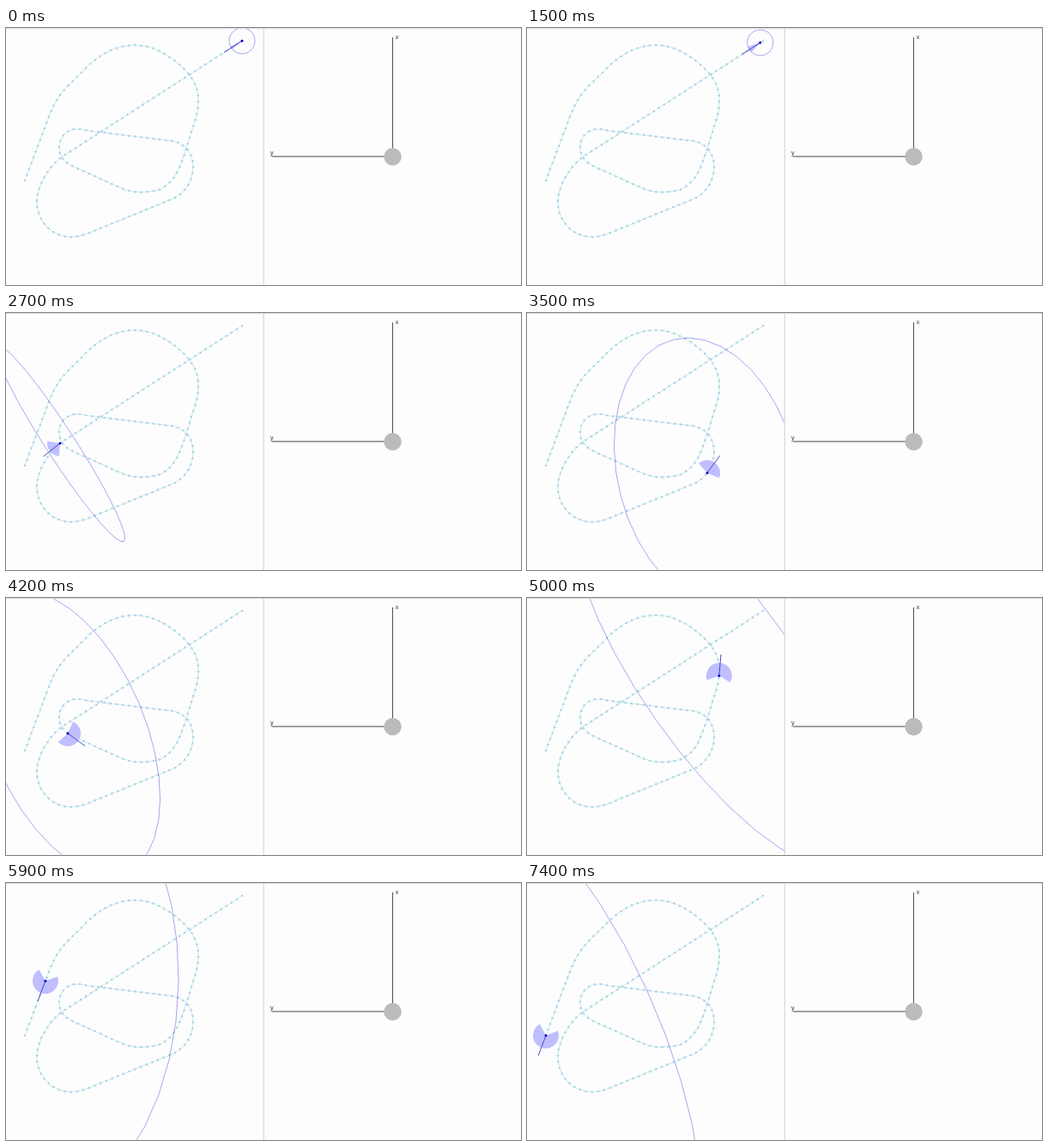
An HTML page with a canvas that plays this animation: 600x300 px, repeating every 7700 ms.

```html
<!DOCTYPE html>
<html lang="en">
<head>
<meta charset="utf-8">
<title>Robot pose uncertainty</title>
<style>
html, body { margin: 0; width: 100%; height: 100%; overflow: hidden; background: #fdfdfd; }
canvas { display: block; }
</style>
</head>
<body>
<canvas id="stage" width="600" height="300"></canvas>
<script>
const ctx = document.getElementById('stage').getContext('2d');
const LOOP = 7700, STEP = 100;

const waypoints = [
  275,15, 72,146, 63,152, 50,166, 40,184, 36,205, 41,223, 55,238, 75,244, 92,241,
  102,237, 188,202, 198,197.5, 209,188, 216,175, 218,162, 216,150, 210,140, 203,135, 195,132,
  186,131, 96,120, 85,118, 76,119, 68,124, 63,132, 62,142, 65,151, 72,158, 79,162, 88,166,
  130,185, 140,189, 152,191.5, 166,191, 180,188, 190,181, 198,171, 204,158, 210,141,
  217,118, 222,102, 224,88, 223,74, 219,63, 213,54, 200,41, 186,31, 169,23, 151,20,
  134,22, 118,28, 104,37, 85,55, 64,77, 58,86, 54,94, 49,106, 22,178
];

// Smooth curve through the waypoints, sampled about once per pixel.
function buildTrack() {
  const pts = [];
  for (let i = 0; i < waypoints.length; i += 2) pts.push({ x: waypoints[i], y: waypoints[i + 1] });
  const chords = pts.slice(1).map((p, i) => {
    const dx = p.x - pts[i].x, dy = p.y - pts[i].y, len = Math.hypot(dx, dy);
    return { x: dx / len, y: dy / len, len };
  });
  const tangents = pts.map((p, i) => {
    const a = chords[Math.max(0, i - 1)], b = chords[Math.min(chords.length - 1, i)];
    // Long straights keep their direction up to the joint.
    const wa = a.len > 40 ? 1 : b.len > 40 ? 0 : b.len, wb = b.len > 40 ? 1 : a.len > 40 ? 0 : a.len;
    const x = a.x * wa + b.x * wb, y = a.y * wa + b.y * wb, n = Math.hypot(x, y);
    return { x: x / n, y: y / n };
  });
  const track = [{ ...pts[0], s: 0 }];
  chords.forEach(({ len }, i) => {
    const n = Math.ceil(len);
    for (let k = 1; k <= n; k++) {
      const u = k / n, v = 1 - u;
      const mix = c => pts[i][c] * (1 + 2 * u) * v * v + pts[i + 1][c] * u * u * (3 - 2 * u)
        + len * (tangents[i][c] * u * v * v - tangents[i + 1][c] * u * u * v);
      const last = track[track.length - 1], x = mix('x'), y = mix('y');
      track.push({ x, y, s: last.s + Math.hypot(x - last.x, y - last.y) });
    }
  });
  // Heading, and the heading variance picked up on the way to each sample.
  track.forEach((p, i) => {
    const q = track[i - 1] || p, r = track[i + 1] || p;
    p.dir = Math.atan2(r.y - q.y, r.x - q.x);
    const ds = p.s - q.s, turn = Math.abs(Math.atan2(Math.sin(p.dir - q.dir), Math.cos(p.dir - q.dir)));
    p.noise = 0.0022 * ds + 0.165 * turn + (p.s < 30 ? 0.05 * ds / 30 : 0);
  });
  return track;
}

const track = buildTrack();
const total = track[track.length - 1].s;

function at(s) {
  const i = Math.max(1, track.findIndex(p => p.s >= s - 1e-6));
  const a = track[i - 1], b = track[i], u = (s - a.s) / (b.s - a.s);
  return { x: a.x + (b.x - a.x) * u, y: a.y + (b.y - a.y) * u, dir: (u < 0.5 ? a : b).dir };
}

function distanceTo(x, y) {
  const off = p => Math.hypot(p.x - x, p.y - y);
  return track.reduce((best, p) => off(p) < off(best) ? p : best).s;
}

// Constant acceleration, near constant cruise, then the same deceleration.
const RATE = 1.43, RAMP = 10.5, START = 1335, STOP = 6590;
const rampDistance = RATE * RAMP * RAMP;
const cruise = [
  [START + RAMP * 100, rampDistance],
  [2700, distanceTo(63, 152)],
  [4200, distanceTo(72, 158)],
  [5000, distanceTo(224, 91)],
  [STOP - RAMP * 100, total - rampDistance]
];

function travelled(t) {
  if (t < 1500) return 0;
  if (t >= STOP) return total;
  if (t < cruise[0][0]) return RATE * ((t - START) / 100) ** 2;
  const i = cruise.findIndex(k => k[0] > t);
  if (i < 0) return total - RATE * ((STOP - t) / 100) ** 2;
  const [t0, s0] = cruise[i - 1], [t1, s1] = cruise[i];
  return s0 + (s1 - s0) * (t - t0) / (t1 - t0);
}

// Heading errors swing the robot around every point it has passed.
function uncertainty(pose, s, t) {
  const first = 0.02 + 0.0133 * Math.min(3, Math.max(0, t / 100 - 2));
  let heading = 0, xx = 225 + 0.25 * s, yy = xx, xy = 0;
  const add = (p, w) => {
    const dx = pose.x - p.x, dy = pose.y - p.y;
    heading += w;
    xx += w * dy * dy;
    yy += w * dx * dx;
    xy -= w * dx * dy;
  };
  add(track[0], first);
  for (const p of track) {
    if (p.s > s) break;
    add(p, p.noise);
  }
  const mean = (xx + yy) / 2, r = Math.hypot((xx - yy) / 2, xy);
  return {
    spread: Math.sqrt(heading),
    major: Math.sqrt(mean + r),
    minor: Math.sqrt(mean - r),
    tilt: Math.atan2(2 * xy, xx - yy) / 2
  };
}

function line(x0, y0, x1, y1, color, width = 1) {
  ctx.strokeStyle = color;
  ctx.lineWidth = width;
  ctx.beginPath();
  ctx.moveTo(x0, y0);
  ctx.lineTo(x1, y1);
  ctx.stroke();
}

function disc(x, y, r, color) {
  ctx.fillStyle = color;
  ctx.beginPath();
  ctx.arc(x, y, r, 0, 2 * Math.PI);
  ctx.fill();
}

const DOTS = 182;
const dots = Array.from({ length: DOTS + 1 }, (_, i) => at(total * i / DOTS));

function drawTrack() {
  ctx.strokeStyle = '#add8e6';
  ctx.lineWidth = 0.6;
  ctx.beginPath();
  dots.forEach(p => ctx.lineTo(p.x, p.y));
  ctx.stroke();
  dots.forEach(p => disc(p.x, p.y, 1.3, '#a9d5e5'));
}

function drawRobot(t) {
  const s = travelled(t), pose = at(s), { x, y, dir } = pose;
  const { spread, major, minor, tilt } = uncertainty(pose, s, t);

  ctx.fillStyle = '#bfbfff';
  ctx.beginPath();
  ctx.moveTo(x, y);
  ctx.arc(x, y, 15, dir - spread, dir + spread);
  ctx.fill();

  ctx.strokeStyle = 'rgba(30, 20, 215, 0.5)';
  ctx.lineWidth = 0.75;
  ctx.beginPath();
  for (let i = 0; i < 36; i++) {
    const a = i * Math.PI / 18, u = major * Math.cos(a), v = minor * Math.sin(a);
    ctx.lineTo(x + u * Math.cos(tilt) - v * Math.sin(tilt), y + u * Math.sin(tilt) + v * Math.cos(tilt));
  }
  ctx.closePath();
  ctx.stroke();

  line(x, y, x + 25 * Math.cos(dir), y + 25 * Math.sin(dir), '#3a36c4', 0.9);
  disc(x, y, 1.5, '#0000c8');
}

function drawAxes() {
  line(450.4, 11, 450.4, 150, '#444');
  line(310, 150, 450, 150, '#444');
  disc(450.5, 150.2, 10.3, '#bbb');
  ctx.fillStyle = '#333';
  ctx.font = '7px "Liberation Sans", Arial, sans-serif';
  ctx.fillText('x', 453.7, 13);
  ctx.fillText('y', 308, 148);
}

function draw(t) {
  ctx.fillStyle = '#fdfdfd';
  ctx.fillRect(0, 0, 600, 300);
  ctx.save();
  ctx.beginPath();
  ctx.rect(0, 1, 300, 299);
  ctx.clip();
  drawTrack();
  drawRobot(t);
  ctx.restore();
  drawAxes();
  ctx.fillStyle = '#dedede';
  ctx.fillRect(0, 0, 600, 1);
  ctx.fillRect(299.5, 0, 1.5, 300);
}

let shown = -1;
function tick() {
  const t = Math.floor(performance.now() % LOOP / STEP) * STEP;
  if (t !== shown) draw(shown = t);
  requestAnimationFrame(tick);
}
tick();
</script>
</body>
</html>
```
